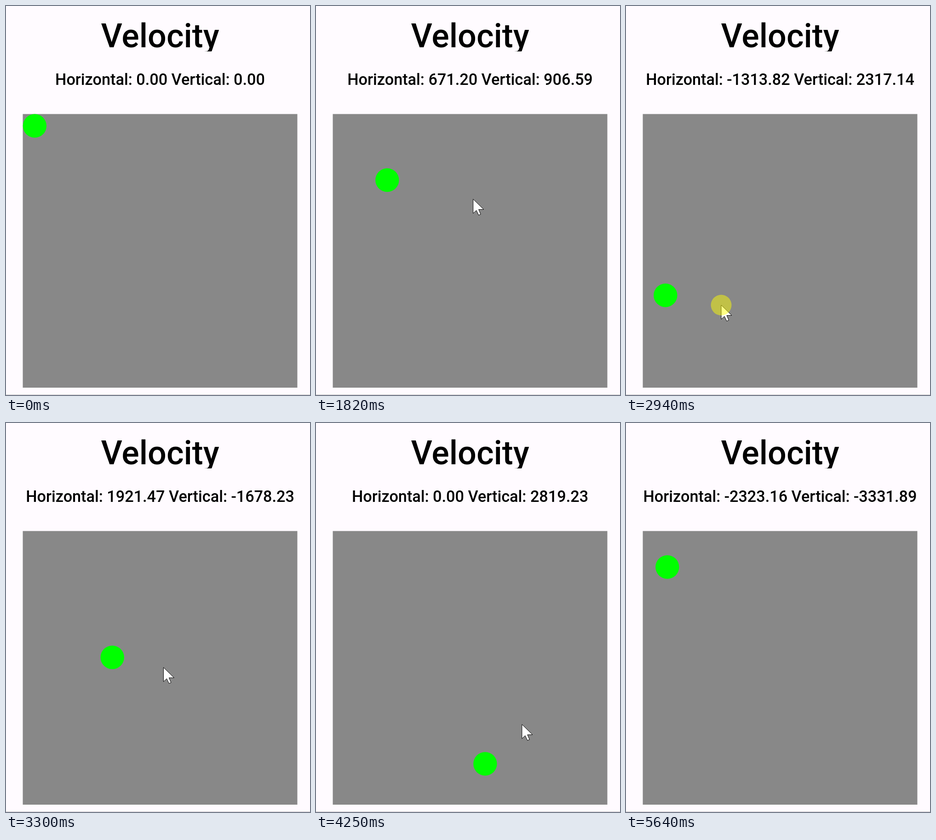
Animation of 661x848 px, one loop 5710 ms. Source, as an HTML page with a canvas:

```html
<!DOCTYPE html>
<html lang="en">
<head>
<meta charset="utf-8">
<title>Velocity</title>
<style>
  html, body { margin: 0; width: 100%; height: 100%; overflow: hidden; background: #fffbff; }
  canvas { display: block; }
</style>
</head>
<body>
<canvas id="stage" width="661" height="848"></canvas>
<script>
const ctx = document.getElementById('stage').getContext('2d');
const LOOP = 5710, REFRESH = 69, FIRST = 95;
const HOLD = 140, DRAG = 130, SWING = 205, DRAG_SHARE = 0.2;
const POINTER = new Path2D('M0 0V31L7 24.5L12 35L16.5 33L12 22.5H23Z');

// Each flick: press, hold, drag the ball, let it coast to rest while the cursor swings on
const flicks = [
  { grab: 935, press: [151.5, 314], swing: [419, 525], rest: [154.8, 379.5], coast: 475, velocity: [671.2, 906.59] },
  { grab: 2050, press: [329, 404], swing: [200, 635], rest: [85.8, 630.7], coast: 540, velocity: [-1313.82, 2317.14] },
  { grab: 3020, press: [207, 652], swing: [400, 480], rest: [364.5, 401], coast: 525, velocity: [1921.47, -1678.23] },
  { grab: 3780, press: [480, 702], swing: [414, 616], rest: [367.8, 743], coast: 320, velocity: [0, 2819.23], clears: true },
  { grab: 4720, press: [545, 775], swing: [450, 650], rest: [89.8, 314], coast: 750, velocity: [-2323.16, -3331.89] }
];

const linear = u => u;
const decelerate = u => 1 - (1 - u) ** 2;
const mix = (a, b, u) => a.map((v, i) => v + (b[i] - v) * u);

// Tracks are lists of { t, at, ease }, where ease leads up to that point
const cursorTrack = [{ t: 120, at: [545, 752] }];
const ballTrack = [{ t: 0, at: [62.4, 261.3] }];
const readings = [{ t: 0, velocity: [0, 0] }];

for (const f of flicks) {
  f.down = f.grab - HOLD;
  f.release = f.grab + DRAG;
  const start = ballTrack[ballTrack.length - 1].at;
  const dragged = mix(start, f.rest, DRAG_SHARE);
  const dragEnd = f.press.map((p, i) => p + dragged[i] - start[i]);

  cursorTrack.push(
    { t: f.down, at: f.press }, { t: f.grab, at: f.press },
    { t: f.release, at: dragEnd }, { t: f.release + SWING, at: f.swing });
  ballTrack.push(
    { t: f.grab, at: start }, { t: f.release, at: dragged },
    { t: f.release + f.coast, at: f.rest, ease: decelerate });
  if (f.clears) readings.push({ t: f.down, velocity: [0, 0] });
  readings.push(
    { t: f.grab + DRAG / 2, velocity: f.velocity.map(v => v * 1.5) },
    { t: f.release, velocity: f.velocity });
}
cursorTrack.push({ t: 5160, at: [560, 860] });

function position(track, t) {
  const next = track.findIndex(p => p.t > t);
  if (next < 0) return track[track.length - 1].at;
  const a = track[next - 1], b = track[next];
  return mix(a.at, b.at, (b.ease || linear)((t - a.t) / (b.t - a.t)));
}

function disc([x, y], radius, color) {
  ctx.fillStyle = color;
  ctx.beginPath();
  ctx.arc(x, y, radius, 0, Math.PI * 2);
  ctx.fill();
}

function label(text, y, size) {
  ctx.font = `500 ${size}px Roboto, sans-serif`;
  ctx.fillStyle = '#000';
  ctx.fillText(text, 335, y);
}

function pointer([x, y]) {
  ctx.save();
  ctx.translate(x, y);
  ctx.fillStyle = '#fff';
  ctx.fill(POINTER);
  ctx.stroke(POINTER);
  ctx.restore();
}

function draw(t) {
  ctx.fillStyle = '#fffbff';
  ctx.fillRect(0, 0, 661, 848);
  ctx.textAlign = 'center';

  ctx.save();
  ctx.beginPath();
  ctx.rect(0, 0, 661, 99);
  ctx.clip();
  label('Velocity', 90, 71.7);
  ctx.restore();

  const [h, v] = readings.filter(r => r.t <= t).pop().velocity;
  label(`Horizontal: ${h.toFixed(2)} Vertical: ${v.toFixed(2)}`, 171.5, 34.2);

  ctx.fillStyle = '#888';
  ctx.fillRect(36.5, 235.5, 597, 596.5);
  ctx.fillStyle = '#c4c1c4';
  ctx.fillRect(0, 847, 661, 1);

  disc(position(ballTrack, t), 25.7, '#0f0');

  if (t >= cursorTrack[0].t) {
    const tip = position(cursorTrack, t);
    pointer(tip);
    if (flicks.some(f => t >= f.down && t < f.release)) disc(tip, 22.5, 'rgba(255, 255, 0, 0.48)');
  }
}

function tick() {
  const t = performance.now() % LOOP;
  draw(t < FIRST ? 0 : t - (t - FIRST) % REFRESH);
  requestAnimationFrame(tick);
}
tick();
</script>
</body>
</html>
```
